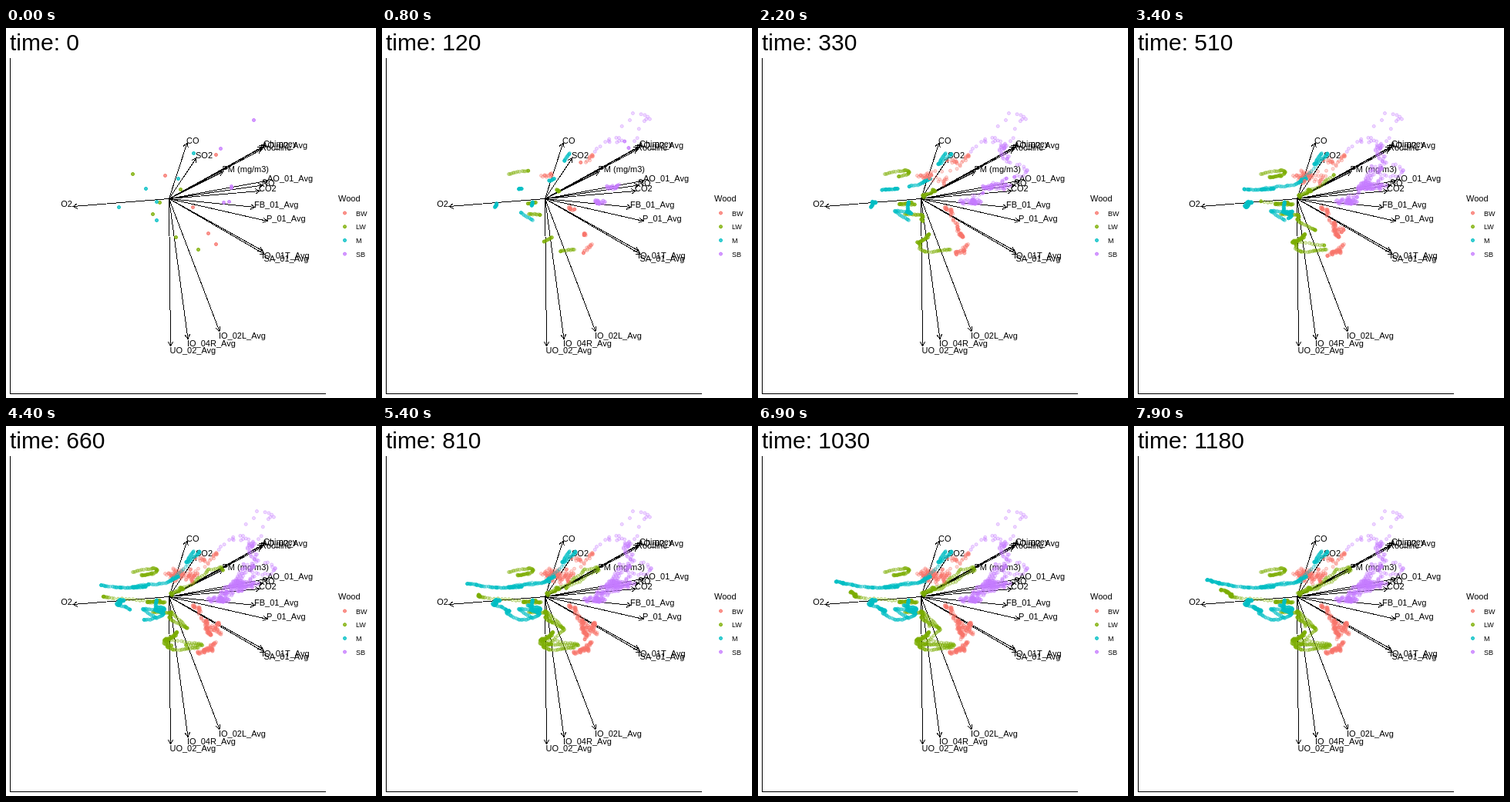
An HTML page with a canvas for the animation above (8 s loop, 480x480 px).

```html
<!DOCTYPE html>
<html lang="en">
<head>
<meta charset="utf-8">
<title>Wood biplot over time</title>
<style>
html, body { margin: 0; width: 100%; height: 100%; overflow: hidden; background: #fff; }
svg, canvas { position: absolute; left: 0; top: 0; width: 480px; height: 480px; }
text { font: 11px "Liberation Sans", Arial, sans-serif; white-space: pre; }
#clock { font-size: 30px; }
.key { font-size: 9px; }
.line { fill: none; stroke: #000; stroke-width: 1; shape-rendering: crispEdges; }
</style>
</head>
<body>
<svg id="plot" viewBox="0 0 480 480">
  <path class="line" d="M5.5 39V474.5H415"/>
  <text id="clock" x="5" y="29">time: 0</text>
  <text x="431" y="225">Wood</text>
</svg>
<canvas id="dots" width="480" height="480"></canvas>
<script>
const plot = document.getElementById('plot');
const clock = document.getElementById('clock');
const ctx = document.getElementById('dots').getContext('2d');
const FRAME = 100, FRAMES = 80, SAMPLE = 10;
const woods = {
  BW: { color: '#F8766D', scatter: 1.5 },
  LW: { color: '#7CAE00', scatter: .6 },
  M: { color: '#00BFC4', scatter: .5 },
  SB: { color: '#C77CFF', scatter: 2.2 }
};
const legendY = i => 239.5 + i * 17.7;

function add(tag, attrs, text = '') {
  const el = document.createElementNS('http://www.w3.org/2000/svg', tag);
  for (const name in attrs) el.setAttribute(name, attrs[name]);
  el.textContent = text;
  plot.append(el);
}

// Arrow from the plot centre, labelled outward from its tip
function loading(name, x, y) {
  const cx = 211.5, cy = 221.5;
  const angle = Math.atan2(y - cy, x - cx);
  const barb = turn => `${x - 6.5 * Math.cos(angle + turn)} ${y - 6.5 * Math.sin(angle + turn)}`;
  add('path', { class: 'line', d: `M${cx} ${cy}L${x} ${y}M${barb(.52)}L${x} ${y}L${barb(-.52)}` });
  add('text', {
    x: x - 1, y: y + (y > 260 ? 9.5 : .5), 'text-anchor': x < cx ? 'end' : 'start'
  }, name);
}

loading('O2', 87, 231.5);
loading('CO', 235, 149);
loading('SO2', 247, 168.5);
loading('PM (mg/m3)', 281.5, 186.5);
loading('Chimney', 335, 153);
loading('AO_02_Avg', 333, 155);
loading('Roofline', 331, 158);
loading('AO_01_Avg', 340, 198);
loading('NO', 333, 204);
loading('CO2', 329, 211.5);
loading('FB_01_Avg', 323, 232.5);
loading('P_01_Avg', 339, 250.5);
loading('IO_01T_Avg', 333, 289);
loading('SA_01_Avg', 335.5, 293.5);
loading('IO_02L_Avg', 277, 393.5);
loading('IO_04R_Avg', 236, 403.5);
loading('UO_02_Avg', 213.5, 412.5);
Object.keys(woods).forEach((name, i) =>
  add('text', { class: 'key', x: 454, y: legendY(i) + 4 }, name));

let seed = 7;
const random = () => (seed = seed * 16807 % 2147483647) / 2147483647;

// Catmull-Rom curve through evenly timed points, u in 0..1
function along(keys, u) {
  const pos = u * (keys.length - 1);
  const i = Math.min(Math.floor(pos), keys.length - 2), f = pos - i;
  const key = n => keys[Math.max(0, Math.min(n, keys.length - 1))];
  return [0, 1].map(k => {
    const [a, b, c, d] = [-1, 0, 1, 2].map(n => key(i + n)[k]);
    return b + f / 2 * (c - a + f * (2 * a - 5 * b + 4 * c - d + f * (3 * (b - c) + d - a)));
  });
}

// Path with a growing smooth wander [x, y], fine scatter and an optional early burst
const trails = [];
function trail(wood, last, wander, keys, burst = 0) {
  const { color, scatter } = woods[wood];
  const phase = [random() * 6, random() * 6];
  const points = [];
  for (let t = 0; t <= last; t += SAMPLE) {
    const grow = Math.min(1, t / 200);
    const noise = t ? scatter + burst * Math.exp(-t / 50) : 0;
    points.push(along(keys, t / last).map((v, k) => v
      + wander[k] * grow * (.65 * Math.sin(t / (31 + 9 * k) + phase[k]) + .35 * Math.sin(t / 13 + phase[k]))
      + noise * (random() * 2 - 1)));
  }
  trails.push({ color, points });
}

trail('BW', 800, [20, 7], [[272, 164], [252, 176], [228, 192], [232, 194], [226, 194]]);
trail('BW', 800, [14, 8], [[206, 191], [236, 195], [216, 193], [236, 194], [224, 196]]);
trail('BW', 810, [3, 3], [[242, 232], [251, 241], [262, 264], [276, 254], [264, 274]]);
trail('BW', 800, [2, 3], [[262, 266], [264, 270], [258, 254], [276, 268], [252, 244]]);
trail('BW', 700, [3, 2], [[272, 280], [257, 293], [268, 287], [250, 294], [270, 281]]);

trail('LW', 510, [1, 1], [[164, 189], [190, 184], [194, 189], [176, 193], [190, 192]]);
trail('LW', 940, [3, 2], [[226, 209], [228, 213], [212, 217], [234, 208], [264, 186], [278, 188], [238, 208], [214, 217]]);
trail('LW', 1190, [2, 0], [[199, 226], [184, 228], [204, 228], [132, 222], [126, 219], [121, 215], [113, 212]]);
trail('LW', 850, [1, 1], [[190, 241], [211, 242], [214, 250], [235, 262], [212, 240], [222, 258]]);
trail('LW', 800, [1, 2], [[220, 271], [209, 277], [222, 268], [206, 277], [211, 285], [236, 264]]);
trail('LW', 940, [3, 1], [[249, 287], [218, 289], [208, 276], [254, 284], [214, 282], [251, 286]]);

trail('M', 540, [1, 1], [[243, 162], [234, 176], [250, 164], [212, 201]]);
trail('M', 810, [2, 1], [[223, 195], [205, 203], [165, 208], [215, 201]]);
trail('M', 1190, [2, 0], [[181, 208], [168, 209], [145, 209], [118, 205], [105, 202], [95, 199]]);
trail('M', 800, [1, 1], [[195, 225], [194, 238], [205, 237], [188, 232]]);
trail('M', 1190, [2, 1], [[146, 232], [151, 225], [144, 230], [163, 239], [159, 237], [155, 235]]);
trail('M', 810, [1, 0], [[195, 249], [178, 237], [198, 240], [202, 245], [180, 251], [161, 242]]);

trail('SB', 510, [2, 2], [[321, 119], [342, 114], [318, 158], [322, 172], [348, 182], [336, 190], [310, 186], [302, 197], [290, 208]], 13);
trail('SB', 510, [4, 4], [[278, 156], [306, 145], [318, 150], [316, 160], [322, 172], [312, 188], [296, 212]], 6);
trail('SB', 670, [16, 3], [[292, 205], [312, 206], [306, 204], [296, 214]]);
trail('SB', 670, [6, 8], [[292, 207], [318, 204], [312, 184], [282, 220]]);
trail('SB', 670, [12, 3], [[282, 226], [270, 224], [280, 222], [290, 214]]);
trail('SB', 670, [8, 5], [[289, 225], [276, 224], [302, 202], [306, 214]]);

function dot([x, y], color, alpha) {
  ctx.fillStyle = ctx.strokeStyle = color;
  ctx.beginPath();
  ctx.arc(x + .5, y + .5, 2, 0, 7);
  ctx.globalAlpha = alpha;
  ctx.fill();
  ctx.globalAlpha = Math.min(1, alpha * 1.5);
  ctx.stroke();
}

function draw(step) {
  const time = step * 15, now = time / SAMPLE;
  clock.textContent = 'time: ' + Math.floor(now) * SAMPLE;
  ctx.clearRect(0, 0, 480, 480);
  Object.values(woods).forEach(({ color }, i) => dot([439, legendY(i)], color, .75));
  for (const { color, points } of trails)
    points.slice(0, Math.ceil(now)).forEach(p => dot(p, color, .28));
  for (const { color, points } of trails) {
    const a = points[Math.floor(now)], b = points[Math.ceil(now)];
    if (a && b) dot([(a[0] + b[0]) / 2, (a[1] + b[1]) / 2], color, .75);
  }
}

let shown = -1, start;
function tick(now) {
  start ??= now;
  const step = Math.floor((now - start) / FRAME) % FRAMES;
  if (step !== shown) draw(shown = step);
  requestAnimationFrame(tick);
}
draw(0);
requestAnimationFrame(tick);
</script>
</body>
</html>
```
